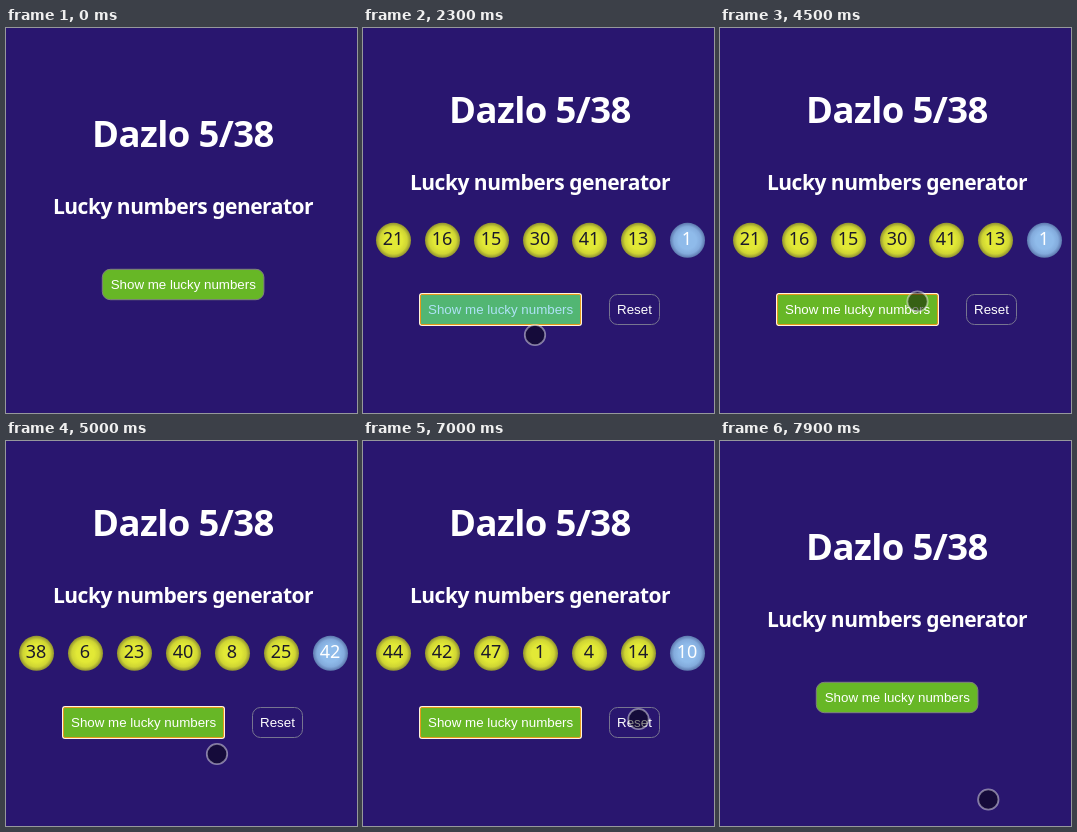
Write an HTML page that moves like this. It is 351 px wide and 385 px high and loops after 8000 ms.

```html
<!DOCTYPE html>
<html lang="en">
<head>
<meta charset="utf-8">
<title>Lucky numbers</title>
<style>
  html, body { margin: 0; width: 100%; height: 100%; overflow: hidden; background: #29166f; }
  svg { display: block; width: 351px; height: 385px; }
  text { text-anchor: middle; fill: #fff; }
  .title, .subtitle { font-family: "Noto Sans", "Open Sans", sans-serif; font-weight: 700; }
  .title { font-size: 36.5px; letter-spacing: -.6px; }
  .subtitle { font-size: 21px; letter-spacing: -.5px; }
  .label { font: 13.333px "Liberation Sans", Arial, sans-serif; }
  .ball text { font: 18px "Noto Sans", "Open Sans", sans-serif; fill: #1c1a2b; }
  .ball.bonus text { fill: #fff; }
  .outline { fill: none; stroke: #777590; }
</style>
</head>
<body>
<svg viewBox="0 0 351 385">
  <defs>
    <radialGradient id="yellow">
      <stop offset=".5" stop-color="#e2e936"/>
      <stop offset=".78" stop-color="#cfd533"/>
      <stop offset="1" stop-color="#8f9030"/>
    </radialGradient>
    <radialGradient id="blue">
      <stop offset=".5" stop-color="#8fbbea"/>
      <stop offset=".78" stop-color="#83abdc"/>
      <stop offset="1" stop-color="#5c77ad"/>
    </radialGradient>
  </defs>

  <g id="headings">
    <text class="title" x="177" y="119">Dazlo 5/38</text>
    <text class="subtitle" x="177" y="186">Lucky numbers generator</text>
  </g>

  <g id="start">
    <rect x="96.3" y="241.3" width="161.6" height="30.4" rx="8" fill="#67b726" stroke="#808080"/>
    <text class="label" x="177.3" y="261">Show me lucky numbers</text>
  </g>

  <g id="results">
    <g id="balls"></g>
    <rect x="56" y="265" width="163" height="33" rx="3" fill="#fff6dc"/>
    <rect x="57.5" y="266.5" width="160" height="30" rx="1.5" fill="#67b726" stroke="#e59a1c"/>
    <text class="label" x="137.6" y="286">Show me lucky numbers</text>
    <rect id="tap" x="58" y="267" width="159" height="29" fill="#33b5e5"/>
    <rect class="outline" x="246.5" y="266.5" width="50" height="30" rx="8"/>
    <text class="label" x="271.5" y="286">Reset</text>
  </g>

  <circle id="cursor" r="10.2" fill="#000" fill-opacity=".47" stroke="#fff" stroke-opacity=".45" stroke-width="1.8"/>
</svg>

<script>
const LOOP = 8000, STEP = 100;
const RESET = 7200;

// Each move takes `steps` equal jumps and arrives at `end`.
const move = (end, steps, x, y) => ({ start: end - steps * STEP, end, x, y });
const moves = [
  move(800, 0, 153, 313),
  move(1100, 2, 246, 219),
  move(1500, 3, 168, 259.5),
  move(2300, 1, 172, 307),
  move(2700, 2, 204, 299),
  move(3000, 1, 176.5, 273),
  move(3500, 2, 206, 276),
  move(4100, 2, 233, 286),
  move(4500, 4, 197.5, 273.5),
  move(5000, 3, 211, 313),
  move(5700, 2, 191, 285.5),
  move(6400, 3, 250, 309),
  move(6700, 2, 277, 280),
  move(7000, 1, 275.5, 278),
  move(7500, 3, 280, 365),
  move(7900, 1, 268.3, 358.5)
];

// The tap highlight fades out just before `clear`.
const draws = [
  { at: 2300, clear: 2700, numbers: [21, 16, 15, 30, 41, 13, 1] },
  { at: 4800, clear: 5000, numbers: Array.from({ length: 7 }, (_, i) => 1 + (37 + 17 * i) % 49) },
  { at: 6100, clear: 6400, numbers: [44, 42, 47, 1, 4, 14, 10] }
];

const $ = id => document.getElementById(id);
const clamp = v => Math.max(0, Math.min(1, v));
const show = (id, on) => $(id).setAttribute('display', on ? 'inline' : 'none');
const shift = (id, x, y) => $(id).setAttribute('transform', `translate(${x} ${y})`);

$('balls').innerHTML = draws[0].numbers.map((_, i) => {
  const x = 30.5 + 49 * i, bonus = i === 6;
  return `<g class="ball${bonus ? ' bonus' : ''}">
    <circle cx="${x}" cy="212.3" r="17.5" fill="url(#${bonus ? 'blue' : 'yellow'})"/>
    <text x="${x - .5}" y="217"></text></g>`;
}).join('');
const ballTexts = [...document.querySelectorAll('.ball text')];

function renderPointer(t) {
  const i = moves.findLastIndex(m => m.start <= t);
  show('cursor', i >= 0);
  if (i < 0) return;
  const to = moves[i], from = moves[i - 1] || to;
  const p = to.end > to.start ? clamp((t - to.start) / (to.end - to.start)) : 1;
  shift('cursor', from.x + (to.x - from.x) * p, from.y + (to.y - from.y) * p);
}

function render(t) {
  const draw = t < RESET && draws.findLast(d => d.at <= t);
  show('start', !draw);
  show('results', draw);
  shift('headings', 0, draw ? -24 : 0);
  if (draw) {
    ballTexts.forEach((el, i) => { el.textContent = draw.numbers[i]; });
    $('tap').setAttribute('opacity', .4 * clamp((draw.clear - t) / (2 * STEP)));
  }
  renderPointer(t);
}

const begin = performance.now();
function tick() {
  const t = (performance.now() - begin) % LOOP;
  render(Math.floor(t / STEP) * STEP);
  requestAnimationFrame(tick);
}
tick();
</script>
</body>
</html>
```
